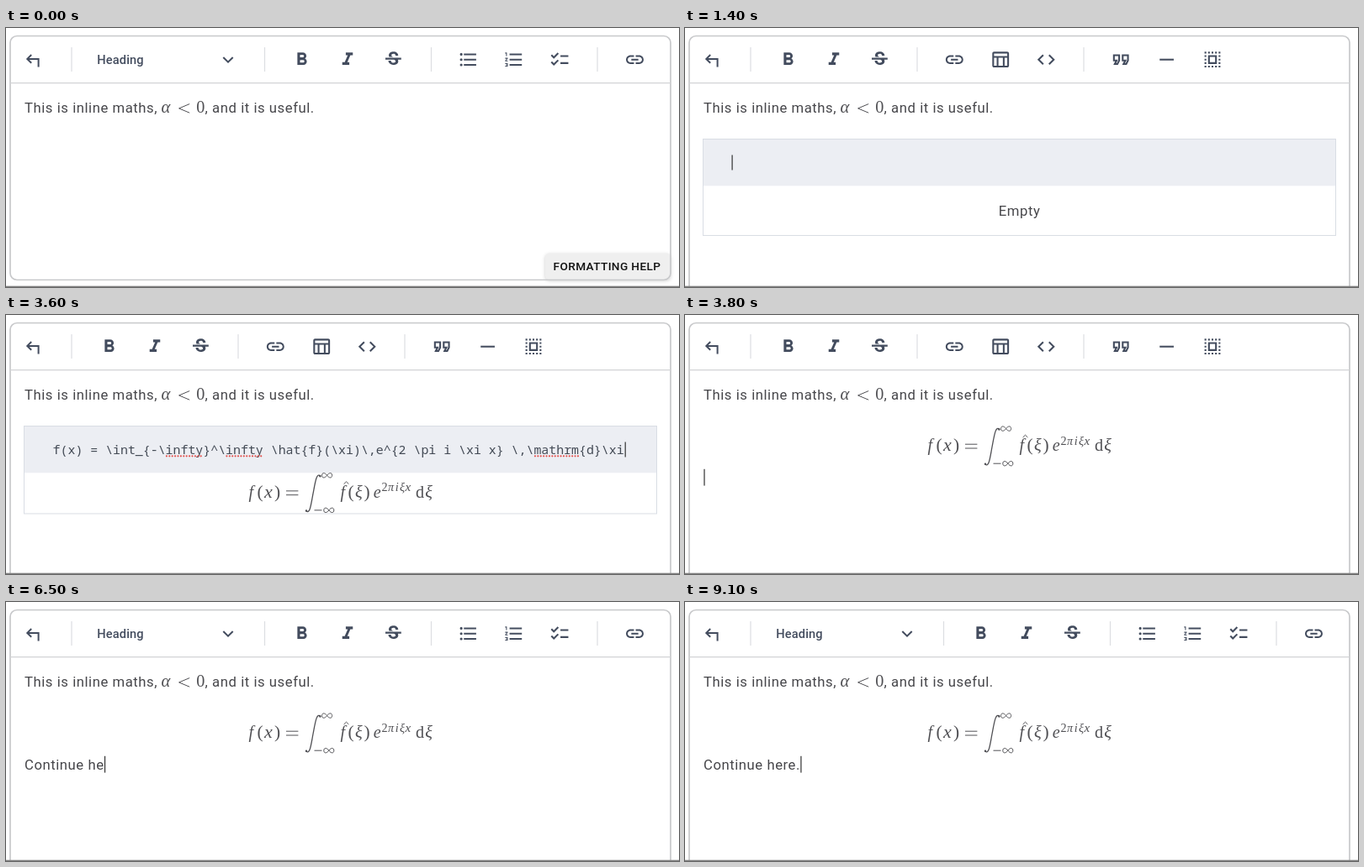
These frames come from a looping animation (800 by 309 pixels, 9630 ms). An HTML page:

```html
<!DOCTYPE html>
<html lang="en">
<head>
<meta charset="utf-8">
<title>Maths editor</title>
<style>
html, body { margin: 0; height: 100%; overflow: hidden; background: #fff; }
svg { display: block; width: 100vw; height: 100vh; }
text { white-space: pre; }
.body { font: 16.7px Roboto, sans-serif; letter-spacing: .545px; fill: #46464a; }
.label { font: 500 14.6px Roboto, sans-serif; letter-spacing: .15px; fill: #434c5e; }
.help { font: 500 13.6px Roboto, sans-serif; letter-spacing: .4px; fill: #111; }
.code { font: 14.9px "Noto Sans Mono", monospace; fill: #434a55; }
.math { font-family: "Liberation Serif", serif; fill: #505054; }
.it { font-style: italic; }
.pen { fill: none; stroke: #505054; stroke-width: 1; }
.icon { fill: #434c5e; }
.line { fill: none; stroke: #434c5e; stroke-width: 2; }
.sep { stroke: #dcdee2; stroke-width: 1.2; }
.wavy { stroke: #e2504c; stroke-width: 2.2; stroke-linecap: round; stroke-dasharray: 0 3.4; }
</style>
</head>
<body>
<svg id="stage" viewBox="0 0 800 309"></svg>
<script>
const LOOP = 9630;
const LINE = 'Continue here.';
const KEYS = [5000, 5200, 5300, 5400, 5500, 5600, 5800, 6000, 6200, 6400, 6500, 6600, 6700, 7100];
const CARET_OFF = [[0, 500], [1900, 2500], [3100, 3600], [4300, 4800], [7600, 8200], [8600, 9100]];
const TEX = String.raw`f(x) = \int_{-\infty}^\infty \hat{f}(\xi)\,e^{2 \pi i \xi x} \,\mathrm{d}\xi`;

const ICONS = {
  bold: 'M15.6 10.79c.97-.67 1.65-1.77 1.65-2.79 0-2.26-1.75-4-4-4H7v14h7.04c2.09 0 3.71-1.7 3.71-3.79 0-1.52-.86-2.82-2.15-3.42zM10 6.5h3c.83 0 1.5.67 1.5 1.5s-.67 1.5-1.5 1.5h-3v-3zm3.5 9H10v-3h3.5c.83 0 1.5.67 1.5 1.5s-.67 1.5-1.5 1.5z',
  italic: 'M10 4v3h2.21l-3.42 8H6v3h8v-3h-2.21l3.42-8H18V4z',
  strike: 'M6.85 7.08C6.85 4.37 9.45 3 12.24 3c1.64 0 3 .49 3.9 1.28.77.65 1.46 1.73 1.46 3.24h-3.01c0-.31-.05-.59-.15-.85-.29-.86-1.2-1.28-2.25-1.28-1.86 0-2.34 1.02-2.34 1.7 0 .48.25.88.74 1.21.38.25.77.48 1.41.7H7.39c-.21-.34-.54-.89-.54-1.92zM21 12v-2H3v2h9.62c1.15.45 1.96.75 1.96 1.97 0 1-.81 1.67-2.28 1.67-1.54 0-2.93-.54-2.93-2.51H6.4c0 .55.08 1.13.24 1.58.81 2.29 3.29 3.3 5.67 3.3 2.27 0 5.3-.89 5.3-4.05 0-.3-.01-1.16-.48-1.94H21z',
  bullets: 'M2.5 6a1.5 1.5 0 103 0a1.5 1.5 0 10-3 0M2.5 12a1.5 1.5 0 103 0a1.5 1.5 0 10-3 0M2.5 18a1.5 1.5 0 103 0a1.5 1.5 0 10-3 0M7 5h14v2H7zM7 11h14v2H7zM7 17h14v2H7z',
  numbers: 'M2 17h2v.5H3v1h1v.5H2v1h3v-4H2zm1-9h1V4H2v1h1zm-1 3h1.8L2 13.1v.9h3v-1H3.2L5 10.9V10H2zM7 5h14v2H7zM7 11h14v2H7zM7 17h14v2H7z',
  checks: 'M22 7h-9v2h9zm0 8h-9v2h9zM5.54 11L2 7.46l1.41-1.41 2.12 2.12 4.24-4.24 1.41 1.41zm0 8L2 15.46l1.41-1.41 2.12 2.12 4.24-4.24 1.41 1.41z',
  link: 'M3.9 12c0-1.71 1.39-3.1 3.1-3.1h4V7H7c-2.76 0-5 2.24-5 5s2.24 5 5 5h4v-1.9H7c-1.71 0-3.1-1.39-3.1-3.1zM8 13h8v-2H8zm9-6h-4v1.9h4c1.71 0 3.1 1.39 3.1 3.1s-1.39 3.1-3.1 3.1h-4V17h4c2.76 0 5-2.24 5-5s-2.24-5-5-5z',
  table: 'M20 3H5c-1.1 0-2 .9-2 2v14c0 1.1.9 2 2 2h15c1.1 0 2-.9 2-2V5c0-1.1-.9-2-2-2zm0 2v3H5V5zm-5 14h-5v-9h5zM5 10h3v9H5zm12 9v-9h3v9z',
  code: 'M9.4 16.6L4.8 12l4.6-4.6L8 6l-6 6 6 6zm5.2 0l4.6-4.6-4.6-4.6L16 6l6 6-6 6z',
  quote: 'M18.62 18h-5.24l2-4H13V6h8v7.24zm-2-2h.76L19 12.76V8h-4v4h3.62zm-8 2H3.38l2-4H3V6h8v7.24zm-2-2h.76L9 12.76V8H5v4h3.62z',
  rule: 'M4 11h16v2H4z'
};

const text = (x, y, s, cls, more = '') =>
  `<text x="${x}" y="${y}" class="${cls}" ${more}>${s.replace(/</g, '&lt;')}</text>`;
const path = (d, cls, more = '') => `<path d="${d}" class="${cls}" ${more}/>`;
const group = (id, inner) => `<g id="${id}">${inner}</g>`;
const place = x => `transform="translate(${x} 37.7) scale(1.045) translate(-12 -12)"`;
const icon = (name, x) => path(ICONS[name], 'icon', place(x));
const seps = (...xs) => xs.map(x => path(`M${x} 23V52`, 'sep')).join('');
const math = (x, y, s, size = 20.2, cls = '') => text(x, y, s, 'math ' + cls, `font-size="${size}"`);
const infinity = (x, y) => path('M-6 0C-6-3.6-2.5-3.6 0 0S6 3.6 6 0S2.5-3.6 0 0S-6 3.6-6 0', 'pen', `transform="translate(${x} ${y})"`);
const wavy = (from, count) => path(`M${56.8 + from * 8.94} 168.3h${count * 8.94 - 2}`, 'wavy');
const styles = x => icon('bold', x) + icon('italic', x + 54.4) + icon('strike', x + 108.8);

const textBar = seps(307.5, 505.5, 703) + text(108.2, 42.6, 'Heading', 'label') +
  path('M258.3 35l5.7 5.7 5.7-5.7', 'line') + styles(351.6) + icon('bullets', 549.5) +
  icon('numbers', 603.8) + icon('checks', 658) + icon('link', 747.5);

const codeBar = seps(276, 474) + styles(122.6) + icon('link', 320.3) + icon('table', 374.7) +
  icon('code', 429.3) + icon('quote', 518.2) + icon('rule', 572.6) +
  path('M3 4H21M3 20H21M4 7V18M20 7V18', 'line', place(627) + ' stroke-dasharray="2 2"') +
  path('M8 8H16V16H8Z', 'line', place(627));

const formula =
  math(288.6, 162, 'f', 20.2, 'it') + math(298.6, 162, '(', 21.5) + math(307, 162, 'x', 22, 'it') +
  math(319, 162, ')', 21.5) + path('M333 154.2h14.4M333 159h14.4', 'pen') +
  path('M356.6 178C361.3 182 362.3 172 365 157.5S369.2 132 373.8 136.3', 'pen', 'style="stroke-width:1.3"') +
  '<circle cx="357" cy="177.8" r="1.2" fill="#505054"/><circle cx="373.4" cy="136.5" r="1.2" fill="#505054"/>' +
  infinity(381.6, 135.6) + infinity(383.8, 177.2) + path('M366.5 177.2h9', 'pen') +
  math(397.4, 162, 'f', 20.2, 'it') + path('M401.6 146l2.9-2.8 2.9 2.8', 'pen') +
  math(406.6, 162, '(', 21.5) + math(415, 162, 'ξ', 20.2, 'it') + math(425.4, 162, ')', 21.5) +
  math(436.8, 162, 'e', 20.2, 'it') + math(446.6, 154.5, '2', 14.2) +
  math(454, 154.5, 'π', 14.2, 'it') + math(462.8, 154.5, 'i', 14.2, 'it') +
  math(468, 154.5, 'ξ', 14.2, 'it') + math(474.6, 154.5, 'x', 15, 'it') +
  math(487, 162, 'd', 20.2) + math(498.3, 162, 'ξ', 20.2, 'it');

const block =
  '<rect id="frame" x="21.5" y="132.5" width="752" fill="#fff" stroke="#d9dde4"/>' +
  '<rect x="22" y="133" width="751" height="55.3" fill="#eceef3"/>' +
  group('empty', text(372.8, 223.6, 'Empty', 'body')) +
  group('tex', text(55.6, 166, TEX, 'code')) +
  group('spell', wavy(15, 5) + wavy(23, 5) + wavy(64, 6));

const help =
  '<rect x="641" y="269" width="149" height="31.5" rx="5" fill="#efefef" style="filter:drop-shadow(0 1px 2px #0003)"/>' +
  text(650.6, 288.9, 'FORMATTING HELP', 'help');

const $ = id => document.getElementById(id);
$('stage').innerHTML =
  group('help', help) +
  '<rect id="box" x="5" y="9.5" width="785" rx="8" fill="none" stroke="#c8c9cb" stroke-width="1.7"/>' +
  path('M5 65.6H790', 'sep', 'style="stroke:#d2d3d5"') +
  path('M0 308.4H800', 'sep', 'style="stroke:#858585"') +
  path('M38.6 46.4V36.9H25.6M30.2 32l-4.9 4.9 4.9 4.9', 'line') + seps(78) +
  group('textBar', textBar) + group('codeBar', codeBar) +
  text(22, 101.4, 'This is inline maths,', 'body') + math(184.6, 101.4, 'α', 20.6, 'it') +
  path('M218.2 90.6L205.6 95.9L218.2 101.2', 'pen') + math(226.2, 101.4, '0') +
  text(236.6, 101.4, ', and it is useful.', 'body') +
  group('block', block) + group('formula', formula) +
  text(22, 0, '', 'body', 'id="typed"') +
  '<rect id="caret" width="1.2" fill="#333"/>';

const show = (id, on) => { $(id).style.display = on ? '' : 'none'; };
const set = (id, attrs) => { for (const k in attrs) $(id).setAttribute(k, attrs[k]); };

function draw(t) {
  const start = t < 1400, editing = !start && t < 3800, pasted = t >= 2500;
  const codeMode = !start && t < 5000;
  show('help', start);
  show('textBar', !codeMode);
  show('codeBar', codeMode);
  show('block', editing);
  show('empty', !pasted);
  show('tex', pasted);
  show('spell', t >= 2600);
  show('formula', pasted);
  set('box', { height: start ? 291 : 400 });
  set('frame', { height: pasted ? 104.5 : 115 });
  set('formula', { transform: `translate(0 ${editing ? 55.7 : 0})` });

  const typed = $('typed');
  typed.textContent = start
    ? '$'.repeat((t >= 600) + (t >= 900))
    : LINE.slice(0, KEYS.filter(k => t >= k).length);
  set('typed', { y: start ? 151.3 : 199.8 });

  show('caret', !CARET_OFF.some(([a, b]) => t >= a && t < b));
  if (editing) set('caret', { x: pasted ? 735.6 : 55.5, y: 151.5, height: 18 });
  else set('caret', {
    x: 22.4 + (typed.textContent ? typed.getComputedTextLength() : 0),
    y: start ? 135.6 : 183.8, height: 19.8
  });
}

const begin = performance.now();
function tick() {
  draw((performance.now() - begin) % LOOP);
  requestAnimationFrame(tick);
}
tick();
</script>
</body>
</html>
```
